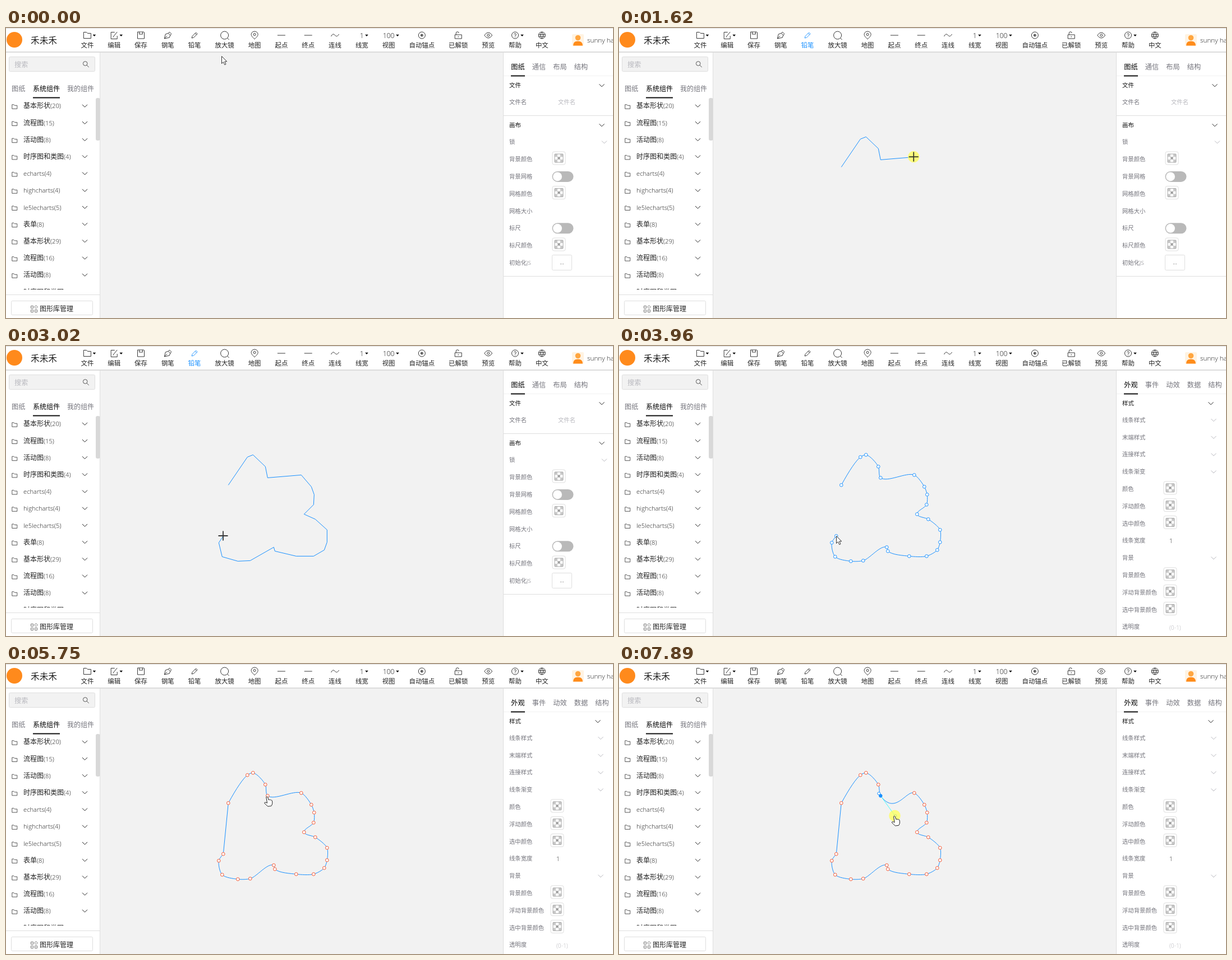
Animation of 1082x518 px, one loop 8 s. Source, as an HTML page:

```html
<!DOCTYPE html>
<html lang="zh">
<head>
<meta charset="utf-8">
<title>铅笔绘图</title>
<style>
html, body { margin: 0; width: 100%; height: 100%; overflow: hidden; background: #fff; }
svg { display: block; width: 100%; height: 100%; }
text { font-family: "Open Sans", "Noto Sans CJK SC", "Noto Sans CJK", sans-serif; font-weight: 350; white-space: pre; }
</style>
</head>
<body>
<svg id="stage" viewBox="0 0 1082 518" xmlns="http://www.w3.org/2000/svg"></svg>
<script>
const BLUE = '#1890ff', RED = '#f5532d', INK = '#222', GREY = '#74747c', PALE = '#b8b8be', RULE = '#dedede';
const LOOP = 8000, TICK = 77.5;

// ---- drawing helpers ----
const mid = 'text-anchor="middle"', bold = 'font-weight="700"', plain = 'font-weight="400"';
const text = (x, y, s, size = 12, fill = INK, more = '') =>
  `<text x="${x}" y="${y + size * 0.37}" font-size="${size}" fill="${fill}" ${more}>` +
  s.replace(/[\x20-\x7e]+/g, m => `<tspan font-size="${size * 0.935}">${m}</tspan>`) + '</text>';
const rect = (x, y, w, h, fill, more = '') =>
  `<rect x="${x}" y="${y}" width="${w}" height="${h}" fill="${fill}" ${more}/>`;
const box = (x, y, w, h, fill = '#fff') => rect(x + .5, y + .5, w, h, fill, `stroke="${RULE}" rx="2"`);
const line = (d, stroke = INK, width = 1) => `<path d="${d}" fill="none" stroke="${stroke}" stroke-width="${width}"/>`;
const disc = (x, y, r, fill, stroke = 'none') => `<circle cx="${x}" cy="${y}" r="${r}" fill="${fill}" stroke="${stroke}"/>`;
const put = (x, y, body) => `<g transform="translate(${x} ${y})">${body}</g>`;
const list = (items, draw) => items.map(draw).join('');
const chevron = (x, y, color = INK) => put(x, y, line('M-4.5-2.2L0 2.3L4.5-2.2', color));
const ring = r => `M${r} 0A${r} ${r} 0 1 0-${r} 0A${r} ${r} 0 1 0 ${r} 0`;

// ---- toolbar ----
const icons = {
  folder: 'M-6.5-5.5h5l2 2h6v9h-13z',
  edit: 'M1-5.5h-6.5v12h11V1M-1 2L5.5-6M-1 2l-.6 1.6',
  save: 'M-6-6h11l1 1V6h-12zM-3-6v4h6v-4',
  pen: 'M-6 6l2-8 5-1.5L4.5 0 3 4zM1-3.5L3-6 6.500-2.500 4.500 0M-6 6l5-5'.replace(/00/g, ''),
  pencil: 'M-5 5l1-3.500L2.500-5 5-2.500-1.500 4zM1-3.500L3.500-1'.replace(/00/g, ''),
  zoom: ring(7) + 'M5 5l3 3',
  pin: 'M0 7C-4 3-6 1-6-1.5A6 5.5 0 0 1 6-1.5C6 1 4 3 0 7zM2-1.5A2 2 0 1 0-2-1.5A2 2 0 1 0 2-1.5',
  dash: 'M-7 0H7',
  wave: 'M-7 2C-4-4-2-2 0 0S4 3 7-2',
  target: ring(6) + ring(2) + ring(1),
  lock: 'M-6-1H6V6H-6zM-4-1V-3.5A2.5 2.5 0 0 1 1-4M0 1.5v2',
  eye: 'M-7 0Q0-10 7 0Q0 10-7 0z' + ring(2),
  help: ring(6) + 'M-1.8-1.5A1.8 1.8 0 1 1 0 .5V1.5M0 2.6V3.6',
  globe: ring(6) + 'M0-6Q-5 0 0 6Q5 0 0-6M-6-1.5H6M-6 2H6',
};
// a trailing "+" marks a drop-down arrow
const tools = ('文件:folder+ 编辑:edit+ 保存:save 钢笔:pen 铅笔:pencil 放大镜:zoom 地图:pin 起点:dash 终点:dash ' +
  '连线:wave 线宽:1+ 视图:100+ 自动锚点:target 已解锁:lock 预览:eye 帮助:help+ 中文:globe').split(' ');
const TOOL_SIZE = 11.4, TOOL_GAP = 25;
let edge = 133.5;
const tool = item => {
  const [label, icon] = item.split(':'), name = icon.replace('+', ''), width = label.length * TOOL_SIZE;
  const x = edge + width / 2;
  edge += width + TOOL_GAP;
  const tip = x + (icons[name] ? 12.5 : 5 + 3.6 * name.length);
  return `<g id="${name}">` + (icons[name] ? put(x, 13, line(icons[name], 'currentColor', .9))
    : text(x, 13.5, name, 13, INK, mid)) + text(x, 31, label, TOOL_SIZE, 'currentColor', mid) +
    (icon === name ? '' : `<path d="M${tip - 2.8} 11.7h5.6l-2.8 3.2z"/>`) + '</g>';
};
const header = rect(0, 0, 1082, 43, '#fff') + rect(0, 0, 1082, 1, RULE) + rect(0, 42, 1082, 2, '#dcdcdc') +
  disc(15, 21, 14, '#ff8a1c') + text(44, 22, '禾未禾', 15.7) + list(tools, tool) +
  rect(1009, 11, 21, 21, '#fff3e2', 'rx="2"') + disc(1019.5, 17.5, 4.8, '#ffa640') +
  '<path d="M1011 31.5q0-8 8.5-8t8.5 8z" fill="#ff8c1a"/>' + text(1036, 21, 'sunny ha', 12.6);

// ---- left side ----
const groups = ['基本形状(20)', '流程图(15)', '活动图(8)', '时序图和类图(4)', 'echarts(4)', 'highcharts(4)',
  'le5lecharts(5)', '表单(8)', '基本形状(29)', '流程图(16)', '活动图(8)', '时序图和类图(4)'];
const group = (s, i) => put(0, 139 + 30.2 * i,
  put(15.3, 1.3, line('M-4.5-3.5h3l1.5 1.5h4.5v6h-9z', '#444', .9)) + text(31, 0, s) + chevron(140.5, 0));
const side = rect(0, 44, 167, 474, '#fff') + rect(167, 44, 1, 474, RULE) +
  box(5, 51, 153, 26, '#f2f2f2') + text(15, 65, '搜索', 12.2, PALE) +
  put(141.2, 63.5, line(ring(3.8) + 'M2.8 3L6.6 6.5', '#555')) +
  text(10, 108.5, '图纸', 12.2, GREY) + text(48, 108.5, '系统组件', 12, '#000', plain) +
  text(109, 108.5, '我的组件', 12, GREY) + rect(48, 123.5, 48, 2, '#111') +
  `<g clip-path="url(#list)">${list(groups, group)}</g>` + rect(160, 125, 7.5, 76, '#d8d8d8', 'rx="3"') +
  rect(0, 476, 167, 1, RULE) + box(9, 487, 145, 25) +
  line('M44.5 496.5h4v4h-4zM44.5 503.5h4v4h-4zM51.5 503.5h4v4h-4zM53.5 495.5l2.8 2.8-2.8 2.8-2.8-2.8z', '#666', .9) +
  text(60, 502, '图形库管理');

// ---- right side ----
const checks = list([...Array(9).keys()], i => i % 2 ? '' :
  rect(-7.5 + 5 * (i % 3), -7.5 + 5 * Math.floor(i / 3), 5, 5, '#c9c9c9'));
const swatch = (x, y) => put(x, y, rect(-11.5, -11.5, 23, 23, '#fff', `stroke="${RULE}" rx="3"`) + checks +
  rect(-7.5, -7.5, 15, 15, 'none', 'stroke="#a8a8a8" rx="1"') + line('M-2-2L2 2M2-2L-2 2', '#777'));
const toggle = y => rect(973.5, y - 9.5, 38, 19, '#b9b9b9', 'rx="9.5"') + disc(983, y, 8, '#fff');
const label = (y, s) => text(897, y, s, 10.35, GREY);
const title = (y, s, x) => text(897, y, s, 10.4, '#111', bold) + chevron(x, y);
const tabs = names => list(names.split(' '), (s, i) =>
  text(912.5 + 37.5 * i, 69, s, 12.2, i ? GREY : '#000', `${mid} ${i ? '' : plain}`)) +
  rect(887, 85, 195, 1, '#f1f1f1') + rect(900, 84.5, 25, 2, '#111');
// the kind of field follows from its label
const rows = (names, top, swatchX, chevronX) => list(names.split(' '), (s, i) => {
  const y = top + 30.8 * i;
  return label(y, s) + (/颜色/.test(s) ? swatch(swatchX, y - 1.8) : '') +
    (/网格$|标尺$/.test(s) ? toggle(y + .3) : '') +
    (/锁|样式|渐变|背景$/.test(s) ? chevron(chevronX, y + .3, PALE) : '');
});
const page = tabs('图纸 通信 布局 结构') + title(102.5, '文件', 1062) + label(132, '文件名') +
  text(984, 132, '文件名', 10.35, PALE) + rect(887, 156, 195, 1, RULE) + title(173.5, '画布', 1062) +
  rows('锁 背景颜色 背景网格 网格颜色 网格大小 标尺 标尺颜色 初始化JS', 203.5, 985.5, 1066.5) +
  box(973, 405, 35, 27) + text(991, 418, '...', 11, INK, mid) + rect(887, 443, 195, 1, RULE);
const props = tabs('外观 事件 动效 数据 结构') + title(102.5, '样式', 1055) +
  rows('线条样式 末端样式 连接样式 线条渐变 颜色 浮动颜色 选中颜色 线条宽度 背景 背景颜色 浮动背景颜色 选中背景颜色 透明度',
    132, 982.5, 1060) + text(981, 348, '1', 11) + text(981, 502.5, '(0-1)', 11, PALE);

const stage = document.getElementById('stage');
stage.innerHTML = '<clipPath id="list"><path d="M0 126H160V467.5H0z"/></clipPath>' +
  rect(0, 0, 1082, 518, '#f2f2f2') + side + rect(886, 44, 196, 474, '#fff') + rect(886, 44, 1, 474, RULE) +
  `<g id="page">${page}</g><g id="props">${props}</g><g color="${INK}">${header}</g>` +
  '<g id="art" transform="translate(.3 .4)"></g><g id="cursor"></g>';
const part = id => document.getElementById(id);
const show = (id, on) => part(id).setAttribute('display', on ? 'inline' : 'none');

// ---- the sketch ----
const knots = [[396, 248], [430, 198], [440, 194], [462, 215], [466, 235], [526, 230], [544, 251], [549, 265],
  [548, 283], [531, 300], [551, 309], [572, 328], [572, 350], [567, 364], [548, 375], [517, 375], [479, 366],
  [477, 359], [435, 383], [413, 384], [385, 376], [379, 351], [387, 339]];
const PICKED = 4, first = knots[0], last = knots[knots.length - 1];
const trail = document.createElementNS(stage.namespaceURI, 'path');
trail.setAttribute('d', 'M' + knots.join('L'));
const trailLength = trail.getTotalLength();

const sub = (a, b) => [a[0] - b[0], a[1] - b[1]];
const along = (p, v, k) => [p[0] + v[0] * k, p[1] + v[1] * k];
const size = v => Math.hypot(...v);
const unit = v => along([0, 0], v, 1 / size(v));
const mix = (a, b, k) => along(a, sub(b, a), k);

// handles lie on the bisecting tangent, a quarter of each neighbour's distance away
const handles = knots.map((p, i) => {
  if (p === first || p === last) return {};
  const back = sub(p, knots[i - 1]), ahead = sub(knots[i + 1], p);
  const dir = unit(along(unit(back), unit(ahead), 1));
  return { prev: along(p, dir, -size(back) / 4), next: along(p, dir, size(ahead) / 4) };
});
// the opposite handle keeps its length and turns with the dragged one
const dragged = k => {
  const p = knots[PICKED], { prev, next } = handles[PICKED], pulled = mix(next, [492, 271], k);
  return { prev: along(p, unit(sub(pulled, p)), -size(sub(prev, p))), next: pulled };
};

function curve(pull, closed, hover, picked) {
  const grip = dragged(pull), at = i => i === PICKED ? grip : handles[i];
  const d = knots.map((p, i) => {
    if (!i) return 'M' + p;
    const pulls = [at(i - 1).next, at(i).prev].filter(Boolean);
    return (pulls.length > 1 ? 'C' : 'Q') + [...pulls, p].join(' ');
  }).join('') + (closed ? 'Z' : '');
  const dot = (p, color, fill = '#fff', r = 2.8) => disc(...p, r, fill, color);
  return line(d, BLUE) + (picked ? line(`M${grip.prev}L${knots[PICKED]}L${grip.next}`, '#4ff') : '') +
    list(knots, (p, i) => picked && i === PICKED ? dot(p, BLUE, BLUE) : dot(p, hover ? RED : BLUE)) +
    (picked ? dot(grip.prev, BLUE, '#fff', 2.5) + dot(grip.next, BLUE, '#fff', 2.5) : '');
}

// ---- time ----
const ramp = (t, from, to) => Math.min(1, Math.max(0, (t - from) / (to - from)));
const drawn = t => trailLength * ramp(t, 910, 2880) ** 1.16;

// pointer moves: start, end, destination
const moves = [[70, 300, [337, 20]], [460, 850, first], [4880, 4950, [411, 333]], [4970, 5730, [466, 236]],
  [5810, 5890, [465, 235]], [6660, 6965, [475.5, 240]], [7120, 7820, [491.5, 271]]];
function pointer(t) {
  if (t >= 910 && t < 3960) {
    const { x, y } = trail.getPointAtLength(drawn(t));
    return [x, y];
  }
  return moves.filter(m => (m[0] > 910) === (t > 910))
    .reduce((p, [from, to, goal]) => mix(p, goal, ramp(t, from, to)), t > 910 ? last : [384, 50]);
}
const shapes = {
  arrow: '<path d="M.5.5V13.5L3.5 10.7 5.8 15.7 8 14.7 5.8 9.9H9.8z" fill="#fff" stroke="#333"/>',
  cross: line('M-8.5 0H8.5M0-8.5V8.5', '#1c1c1ce0', 1.8),
  hand: '<path d="M-2 1.5Q-.5-.3.8 1.5L2.3 6.5Q3.5 5.3 4.6 6.5 6 5.5 6.8 7 8.3 6.5 8.6 8.2L9 12Q8.8 15 7 17.3L1 18Q-2 15.5-5 12.5-5.3 10.3-3 10.8L-.3 12z" fill="#fffd" stroke="#222"/>',
};

function render(now) {
  // the pointer is sampled at a steady rate, switches are immediate
  const t = now < 70 ? 0 : 70 + Math.floor((now - 70) / TICK) * TICK;
  const during = (from, to) => now >= from && now < to;
  const pos = pointer(t), drawing = during(380, 3960);
  part('pencil').setAttribute('color', drawing ? BLUE : INK);
  show('page', now < 3180);
  show('props', now >= 3180);

  const length = drawn(t);
  part('art').innerHTML = now >= 3100 ? curve(ramp(t, 7120, 7820), now >= 4500, now >= 5750, now >= 6440)
    : length ? `<path d="${trail.getAttribute('d')}" fill="none" stroke="${BLUE}" stroke-dasharray="${length} 9999"/>` : '';

  const overButton = t > 70 && pos[1] < 43;
  const kind = overButton || now >= 5750 ? 'hand' : drawing ? 'cross' : 'arrow';
  const pressed = during(380, 460) || during(910, 3015) || during(6440, 6500) || now >= 7130;
  part('cursor').innerHTML = put(...pos, (pressed ? disc(0, 0, 10.3, '#ffff50b8') : '') + shapes[kind]);
}

const start = performance.now();
function tick() {
  render((performance.now() - start) % LOOP);
  requestAnimationFrame(tick);
}
tick();
</script>
</body>
</html>
```
